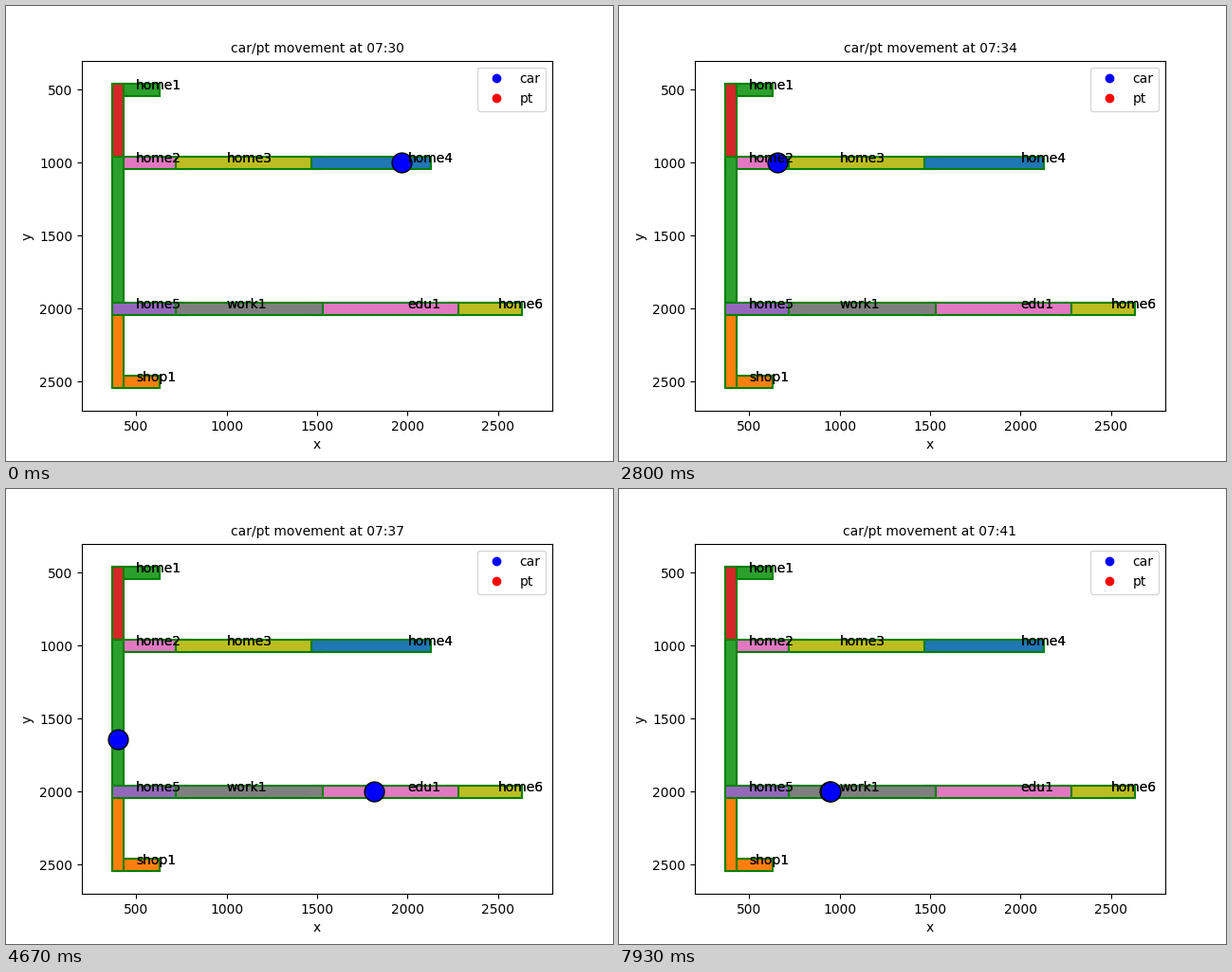
Animation of 640 by 480 pixels, one loop 8 s. Source, as a matplotlib script:

```python
import math

import matplotlib.pyplot as plt
from matplotlib.animation import FuncAnimation
from matplotlib.lines import Line2D
from matplotlib.patches import Rectangle

FRAMES = 120
LOOP_MS = 8000
PAD_X, PAD_Y = 30, 40

# Road segments in drawing order: x0, y0, x1, y1, colour
ROADS = [
    (2250, 2000, 2600, 2000, "tab:olive"),
    (1500, 2000, 2250, 2000, "tab:pink"),
    (400, 500, 600, 500, "tab:green"),
    (400, 500, 400, 1000, "tab:red"),
    (400, 1000, 750, 1000, "tab:pink"),
    (750, 1000, 1500, 1000, "tab:olive"),
    (1500, 1000, 2100, 1000, "tab:blue"),
    (400, 1000, 400, 2000, "tab:green"),
    (400, 2500, 600, 2500, "tab:orange"),
    (400, 2000, 400, 2500, "tab:orange"),
    (400, 2000, 750, 2000, "tab:purple"),
    (750, 2000, 1500, 2000, "tab:gray"),
]

PLACES = {
    "home1": (500, 500),
    "home2": (500, 1000),
    "home3": (1000, 1000),
    "home4": (2000, 1000),
    "home5": (500, 2000),
    "work1": (1000, 2000),
    "edu1": (2000, 2000),
    "home6": (2500, 2000),
    "shop1": (500, 2500),
}

# Trips: departure step, distance per step, nodes passed
TRIPS = [
    (0, 32, [(2000, 1000), (1500, 1000), (750, 1000), (400, 1000),
             (400, 2000), (750, 2000), (942, 2000)]),
    (50, 100 / 3, [(2500, 2000), (2250, 2000), (1500, 2000),
                   (750, 2000), (950, 2000)]),
]


def locate(step, start, speed, nodes):
    """Position after whole steps; every segment ends exactly on its node."""
    left = step - start
    if left < 0:
        return None
    for (xa, ya), (xb, yb) in zip(nodes, nodes[1:]):
        length = math.hypot(xb - xa, yb - ya)
        needed = math.ceil(length / speed)
        if left < needed:
            part = left * speed / length
            return xa + (xb - xa) * part, ya + (yb - ya) * part
        left -= needed
    return nodes[-1]


fig, ax = plt.subplots(figsize=(6.4, 4.8), dpi=100)
ax.set(xlim=(200, 2800), ylim=(2700, 300), xlabel="x", ylabel="y")
ax.set_xticks(range(500, 2501, 500))
ax.set_yticks(range(500, 2501, 500))
title = ax.set_title("", fontsize=10)

for x0, y0, x1, y1, color in ROADS:
    ax.add_patch(Rectangle((x0 - PAD_X, y0 - PAD_Y),
                           x1 - x0 + 2 * PAD_X, y1 - y0 + 2 * PAD_Y,
                           facecolor=color, edgecolor="green", linewidth=1.5))

# Labels are laid down twice, which gives them their heavier look
for name, (x, y) in PLACES.items():
    for _ in range(2):
        ax.text(x, y, name)

cars = [ax.plot([], [], "o", color="blue", markeredgecolor="black",
                markersize=15)[0] for _ in TRIPS]

ax.legend(handles=[Line2D([], [], marker="o", linestyle="none",
                          color=color, label=label)
                   for label, color in (("car", "blue"), ("pt", "red"))],
          loc="upper right")


def update(frame):
    step = frame + 1
    title.set_text(f"car/pt movement at 07:{30 + step // 10:02d}")
    for car, trip in zip(cars, TRIPS):
        spot = locate(step, *trip)
        car.set_data(*([[v] for v in spot] if spot else ([], [])))
    return [title, *cars]


anim = FuncAnimation(fig, update, frames=FRAMES, interval=LOOP_MS / FRAMES,
                     repeat=True, repeat_delay=0, blit=False)
plt.show()
```
